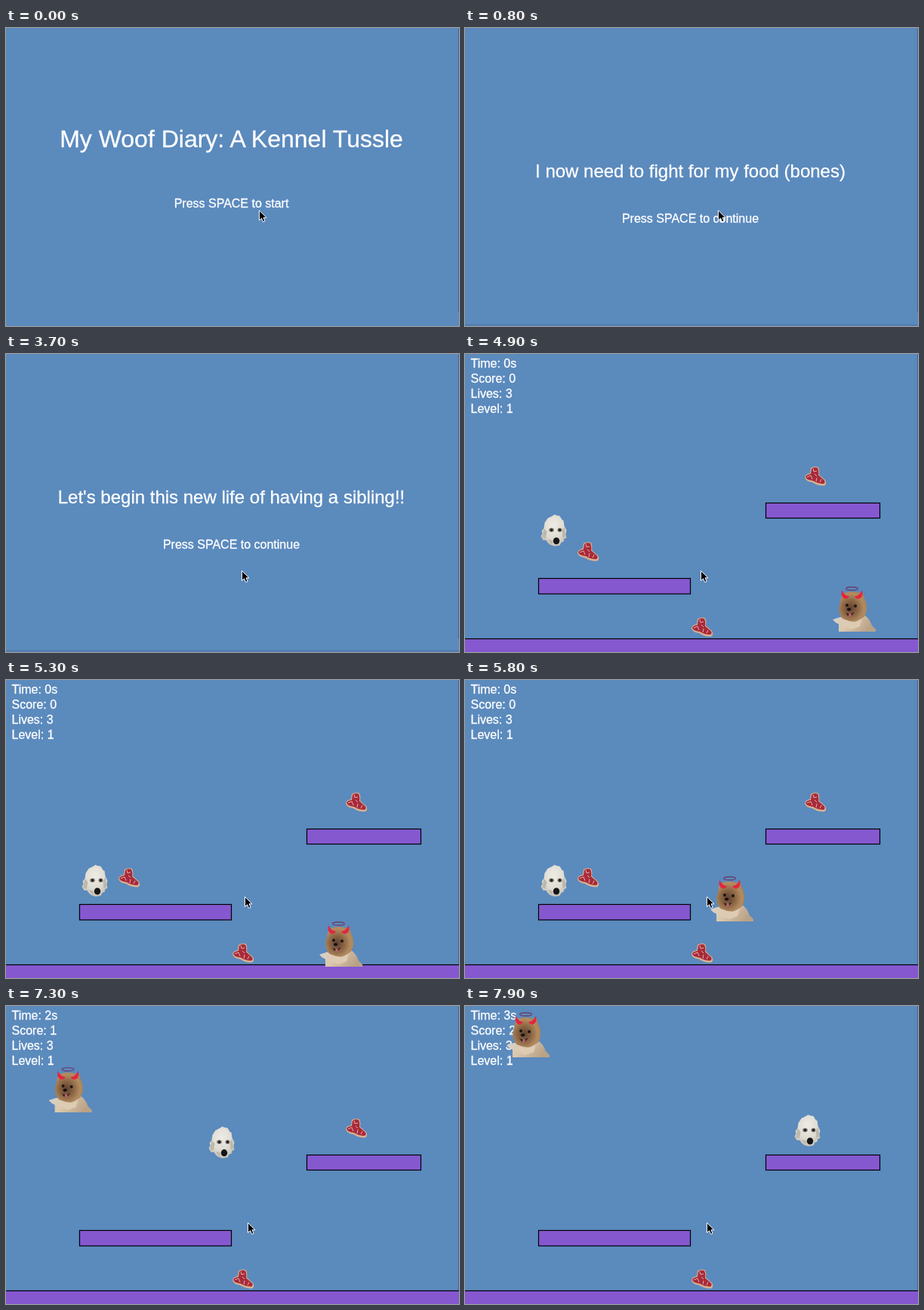
These frames come from a looping animation (600 px wide and 395 px high, 8000 ms). An HTML page:

```html
<!DOCTYPE html>
<html lang="en">
<head>
<meta charset="utf-8">
<style>
  html, body { margin: 0; width: 100%; height: 100%; overflow: hidden; background: #5b8abd; }
  svg { display: block; width: 100%; height: 100%; font-family: "Liberation Sans", Arial, sans-serif; }
  text { fill: #fff; stroke: #fff; stroke-width: .3; white-space: pre; }
  .mid { text-anchor: middle; }
  .block { fill: #8558d0; stroke: #000; stroke-width: 1.2; }
</style>
</head>
<body>
<svg viewBox="0 0 600 395">
  <defs>
    <radialGradient id="fur" cx=".42" cy=".55" r=".6">
      <stop offset="0" stop-color="#5f4030"/>
      <stop offset=".45" stop-color="#8d6745"/>
      <stop offset=".8" stop-color="#b28c60"/>
      <stop offset="1" stop-color="#a98358"/>
    </radialGradient>
    <radialGradient id="wool" cx=".5" cy=".35" r=".65">
      <stop offset="0" stop-color="#eeece5"/>
      <stop offset=".6" stop-color="#dfdcd3"/>
      <stop offset="1" stop-color="#c6c2b7"/>
    </radialGradient>
    <linearGradient id="coat" x2="1" y2=".3">
      <stop offset="0" stop-color="#d5d3d0"/>
      <stop offset=".45" stop-color="#dcc8ae"/>
      <stop offset="1" stop-color="#b9a286"/>
    </linearGradient>
    <g id="steak">
      <path d="M8 2Q13-1 18 1Q20 5 19 11L27 18Q30 23 26 25.500Q17 26 10 21Q1 20 0 14Q1 10 7 9Z" fill="#d9b191"/>
      <path d="M9 3Q13 0 17 2Q19 6 18 11.500L25.500 18Q28 21 25 23Q17 23 11 19Q2 18 1 13.500Q3 10.500 8 10Z" fill="#a82a3a"/>
      <path d="M11 3l1 4 4-1M3 14l5-2 2 5M13 10l3 3M15 20l1-5M20 21l2-4" fill="none" stroke="#e0aeab"/>
    </g>
  </defs>

  <rect width="600" height="395" fill="#5b8abd"/>

  <g id="talk">
    <rect id="shade" y="392.500" width="600" height="2.500" fill="#527daf"/>
    <text id="head" class="mid" x="298.500"/>
    <text id="hint" class="mid" x="298.500" font-size="16"/>
  </g>

  <g id="game">
    <rect class="block" x="97.500" y="297.500" width="201" height="20.500"/>
    <rect class="block" x="398.500" y="197.500" width="151" height="20"/>
    <rect class="block" x="-2" y="377.500" width="604" height="20"/>
    <g id="stats" font-size="16"></g>
    <use id="low" href="#steak" x="149" y="249"/>
    <use href="#steak" x="300" y="349"/>
    <use id="high" href="#steak" x="450" y="149"/>
    <g id="dog">
      <path d="M15 2L18 0L20 1L25 2L28 7L30 8L31 15L34 21L33 26L34 31L31 32L30 36L27 37L25 41L18 42L12 40L9 37L7 34L3 34L0 29L2 25L1 22L4 18L5 11L9 5Z" fill="url(#wool)"/>
      <path d="M4 18L2 30L6 32L8 23ZM31 16L33 29L29 31L28 22ZM9 33L14 40L16 35Z" fill="#bdb8ac"/>
      <ellipse cx="14" cy="20.500" rx="3.400" ry="2.800" fill="#8f8a82"/>
      <ellipse cx="25" cy="20.500" rx="3" ry="2.800" fill="#8f8a82"/>
      <circle cx="14" cy="20.500" r="2" fill="#2b2727"/>
      <circle cx="25" cy="20.500" r="2" fill="#2b2727"/>
      <ellipse cx="20.500" cy="35" rx="4.200" ry="4.600" fill="#161518"/>
    </g>
    <g id="foe">
      <path d="M8 60L8 50Q3 48 0 44L9 41L42 38Q49 43 52 52L57 57V60Z" fill="url(#coat)"/>
      <path d="M14 11L17 8L25 7L34 8L40 9L42 15L45 24L45 33L42 40L36 44L30 47L22 46L13 43L9 36L8 28L10 21L11 14Z" fill="url(#fur)"/>
      <path d="M12 42Q24 52 39 43L36 53L25 57L14 52Z" fill="#ddcbb3"/>
      <circle cx="19" cy="25" r="2" fill="#1d1512"/>
      <circle cx="30" cy="26" r="2" fill="#1d1512"/>
      <ellipse cx="21.500" cy="30.500" rx="2.600" ry="2" fill="#15100f"/>
      <path d="M17 35Q23 38 29 34L25 39H20Z" fill="#33211c"/>
      <ellipse cx="23" cy="38" rx="2" ry="2.300" fill="#b8606a"/>
      <path id="horn" d="M12 5Q10 14 16 16.500Q20 17 22 13Q16 13 12 5Z" fill="#e3263f"/>
      <use href="#horn" transform="matrix(-1 0 0 1 51 0)"/>
      <ellipse cx="25.500" cy="3" rx="7.800" ry="2.200" fill="none" stroke="#6a3560" stroke-width="1.200"/>
    </g>
  </g>

  <path d="M599.500 0V377" stroke="#45689a"/>
  <g id="cursor">
    <path d="M.4.800V14L3.500 11.200L5.600 16L8 15L6 10.300H10Z" stroke="#fff"/>
  </g>
</svg>

<script>
const LOOP = 8000, STEP = 100, START = 4800;
const $ = id => document.getElementById(id);

// until, heading, size, baseline, hint, hint baseline
const cards = [
  [300, "My Woof Diary: A Kennel Tussle", 32, 158, "Press SPACE to start", 238],
  [2500, "I now need to fight for my food (bones)", 24, 198, "Press SPACE to continue", 258],
  [START, "Let's begin this new life of having a sibling!!", 24, 198, "Press SPACE to continue", 258]
];

// rows of time, x, y
const cursorPath = [[800, 335, 241], [1400, 312, 286.5], [5200, 312, 286.5], [5400, 320, 286.5]];
const foePath = [[4800, 505, 296], [4900, 487, 308], [5150, 442, 338], [5800, 325, 260],
                 [6600, 183, 166], [7600, 2.5, 44.5], [7900, 55, 8]];

const stats = [18, 38, 58, 78].map(y => {
  const row = document.createElementNS("http://www.w3.org/2000/svg", "text");
  row.setAttribute("x", 7.5);
  row.setAttribute("y", y - 0.5);
  return $("stats").appendChild(row);
});

function along(path, t) {
  if (t <= path[0][0]) return path[0].slice(1);
  const i = path.findIndex(p => p[0] > t);
  if (i < 0) return path[path.length - 1].slice(1);
  const [a, b] = [path[i - 1], path[i]];
  const k = (t - a[0]) / (b[0] - a[0]);
  return [a[1] + (b[1] - a[1]) * k, a[2] + (b[2] - a[2]) * k];
}

function dogAt(t) {
  const x = 100.5 + 0.28 * Math.max(0, Math.min(t, 7900) - 6700);
  if (t < 7150) return [x, Math.min(245, 204 + 875 * ((t - START) / 1000) ** 2)];
  if (t > 7765) return [x, 144];
  const u = (t - 7150) / 800;
  return [x, 245 - 560 * u * (1 - u)];
}

const move = (id, [x, y]) => $(id).setAttribute("transform", `translate(${x} ${y})`);
const show = (id, on) => $(id).style.display = on ? "" : "none";

function say(id, text, y) {
  $(id).textContent = text;
  $(id).setAttribute("y", y);
}

function draw(t) {
  const playing = t >= START;
  show("talk", !playing);
  show("game", playing);
  move("cursor", along(cursorPath, t));
  if (!playing) {
    const [, head, size, y, hint, hintY] = cards.find(c => t < c[0]);
    say("head", head, y);
    $("head").setAttribute("font-size", size);
    say("hint", hint, hintY);
    show("shade", t >= cards[0][0]);
    return;
  }
  const ateLow = t >= 6800, ateHigh = t >= 7800;
  const seconds = Math.max(0, Math.floor((t - 4850) / 1000));
  [`Time: ${seconds}s`, `Score: ${ateLow + ateHigh}`, "Lives: 3", "Level: 1"]
    .forEach((line, i) => stats[i].textContent = line);
  show("low", !ateLow);
  show("high", !ateHigh);
  move("dog", dogAt(t));
  move("foe", along(foePath, t));
}

function tick() {
  const t = performance.now() % LOOP;
  draw(t - t % STEP);
  requestAnimationFrame(tick);
}
tick();
</script>
</body>
</html>
```
